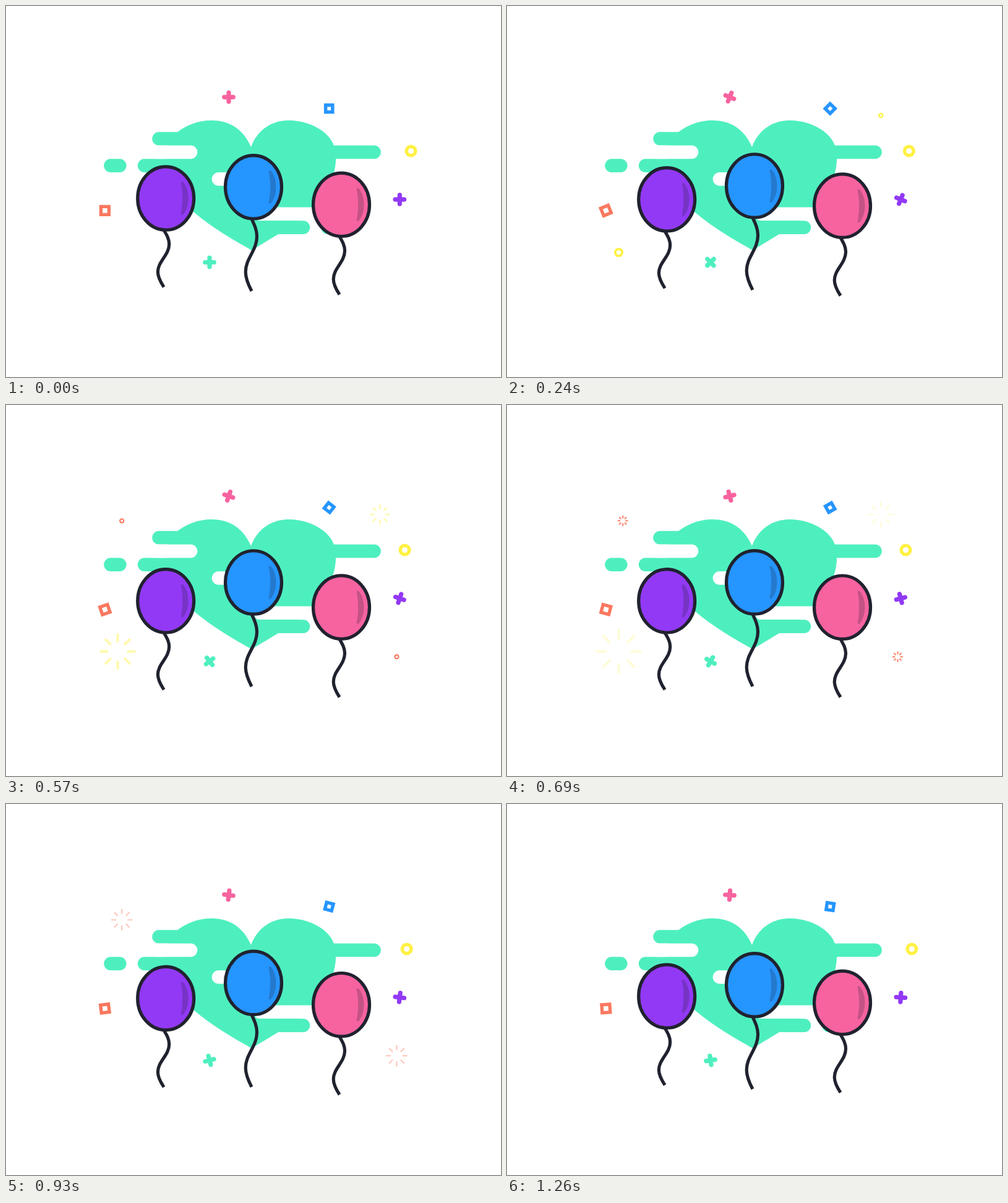
An HTML page that plays this animation: 800 px wide and 600 px high, repeating every 1.29 s.

```html
<!DOCTYPE html>
<html lang="en">
<head>
<meta charset="utf-8">
<title>Balloons</title>
<style>
  html, body { margin: 0; width: 100%; height: 100%; overflow: hidden; background: #fff; }
  svg { display: block; width: 800px; height: 600px; }
</style>
</head>
<body>
<svg id="stage" viewBox="0 0 800 600" fill="none">
  <g fill="#4eefbf">
    <path d="M396 228C385 202 364 185 332 185C310 185 291 193 277 204C264 215 259 230 259 247
      C259 290 280 314 303 333C335 360 367 378 397 395L440 369C500 335 533 290 533 247
      C533 238 532 232 530 226C522 203 491 185 457 185C424 185 404 206 396 228Z"/>
    <rect x="236.3" y="203.8" width="80" height="21.7" rx="10.85"/>
    <rect x="212.8" y="247.2" width="90" height="21.8" rx="10.9"/>
    <rect x="158.2" y="247.2" width="36.4" height="21.8" rx="10.9"/>
    <rect x="500" y="225.5" width="105.8" height="21.7" rx="10.85"/>
  </g>
  <g fill="#fff">
    <rect x="230" y="225.5" width="79.3" height="21.7" rx="10.85"/>
    <rect x="332.7" y="269" width="50" height="21.8" rx="10.9"/>
    <rect x="400" y="325.4" width="140" height="21.8" rx="10.9"/>
  </g>
  <g fill="#4eefbf">
    <rect x="385" y="347.2" width="106.2" height="21.8" rx="10.9"/>
    <rect x="509" y="347.2" width="38" height="21.8" rx="10.9"/>
  </g>
</svg>
<script>
const LOOP = 1290, STEP = 30, CYCLE = 1275;
const INK = '#20222f', GREEN = '#4eefbf', PURPLE = '#9239f5', BLUE = '#2595ff',
      PINK = '#f7639f', YELLOW = '#fff143', ORANGE = '#fa785f';
const stage = document.getElementById('stage');

function add(parent, tag, attrs) {
  const el = document.createElementNS('http://www.w3.org/2000/svg', tag);
  for (const k in attrs) el.setAttribute(k, attrs[k]);
  return parent.appendChild(el);
}

// Spinning confetti; turns is the signed number of turns per cycle
function spinner(x, y, turns, shape) {
  const g = add(stage, 'g');
  add(g, 'path', shape);
  return p => g.setAttribute('transform', `translate(${x} ${y}) rotate(${360 * turns * p})`);
}
const plus = color => ({
  d: 'M0-7.3V7.3M-7.3 0H7.3', stroke: color, 'stroke-width': 7.2, 'stroke-linecap': 'round'
});
const square = (color, side, width) => ({
  d: `M${-side / 2} ${-side / 2}h${side}v${side}h${-side}z`, stroke: color, 'stroke-width': width
});

function slidingRing(x, y, dx) {
  const ring = add(stage, 'circle', { cy: y, r: 7.3, stroke: YELLOW, 'stroke-width': 5.5 });
  return p => {
    const u = p < .5 ? 2 * p : 2 - 2 * p;
    ring.setAttribute('cx', x + dx * (u + u * u - u * u * u));
  };
}

// A ring grows, then splits into eight rays that fly out and fade
function burst(x, y, size, delay, color, cap) {
  const g = add(stage, 'g', { transform: `translate(${x} ${y}) scale(${size})`, stroke: color });
  const ring = add(g, 'circle');
  const rays = add(g, 'path', { 'stroke-linecap': cap });
  return (p, t) => {
    const u = t - delay, grow = (u - 5) / 250, fly = u - 255;
    const isRing = grow > 0 && fly < 0, isRays = fly >= 0 && u < 815;
    ring.setAttribute('visibility', isRing ? 'visible' : 'hidden');
    rays.setAttribute('visibility', isRays ? 'visible' : 'hidden');
    if (isRing) {
      ring.setAttribute('r', 5.9 * grow);
      ring.setAttribute('stroke-width', 4.1 * grow);
    }
    if (isRays) {
      const trim = cap === 'round' ? 1.5 : 0;
      const a = 4 + .0355 * fly + trim, b = 8 + .066 * fly - trim;
      let d = '';
      for (let i = 0; i < 8; i++) {
        const c = Math.cos(i * Math.PI / 4), s = Math.sin(i * Math.PI / 4);
        d += `M${a * c} ${a * s}L${b * c} ${b * s}`;
      }
      rays.setAttribute('d', d);
      rays.setAttribute('stroke-width', 4.8 - fly / 450);
      rays.setAttribute('opacity', Math.min(1, (815 - u) / 580));
    }
  };
}

function balloon(x, y, dy, color, len) {
  const g = add(stage, 'g');
  const v = n => 52 + n * len;
  add(g, 'path', {
    d: `M-3 51.5C2 ${v(8)} 5.5 ${v(14)} 5.5 ${v(22)}C5.5 ${v(40)} -12.8 ${v(50)} -12.8 ${v(67)}
      C-12.8 ${v(76)} -8 ${v(84)} -3 ${v(91.5)}`,
    stroke: INK, 'stroke-width': 5.2
  });
  add(g, 'ellipse', { rx: 45.5, ry: 51.2, fill: color, stroke: INK, 'stroke-width': 5.2 });
  add(g, 'path', {
    d: 'M24.5-25Q26-29 29-25C39-12 39 12 29 25Q26 29 24.5 25C28 10 28-10 24.5-25Z',
    fill: INK, opacity: .24
  });
  return p => {
    const shift = dy * (1 - Math.cos(2 * Math.PI * p)) / 2;
    g.setAttribute('transform', `translate(${x} ${y + shift})`);
  };
}

const parts = [
  spinner(360, 147.3, -1, plus(PINK)),
  spinner(636.3, 312.8, -1, plus(PURPLE)),
  spinner(329, 414.5, 2, plus(GREEN)),
  spinner(522.2, 165.9, -2, square(BLUE, 11.2, 5.4)),
  spinner(159.9, 330.8, 1, square(ORANGE, 13, 5.3)),
  slidingRing(654.5, 234.5, -10.2),
  burst(180.5, 398.6, 1, 0, YELLOW, 'butt'),
  burst(604.2, 177, .57, 0, YELLOW, 'butt'),
  burst(187.2, 187.3, .57, 337, ORANGE, 'round'),
  burst(631.4, 407.2, .57, 337, ORANGE, 'round'),
  balloon(258.2, 311, 6, PURPLE, 1),
  balloon(400, 292.8, -6, BLUE, 1.27),
  balloon(542, 321.3, 6, PINK, 1.02)
];

function frame(now) {
  const t = Math.floor(now % LOOP / STEP) * STEP;
  for (const part of parts) part(t / CYCLE, t);
}
function tick() {
  frame(performance.now() - start);
  requestAnimationFrame(tick);
}
const start = performance.now();
tick();
</script>
</body>
</html>
```
